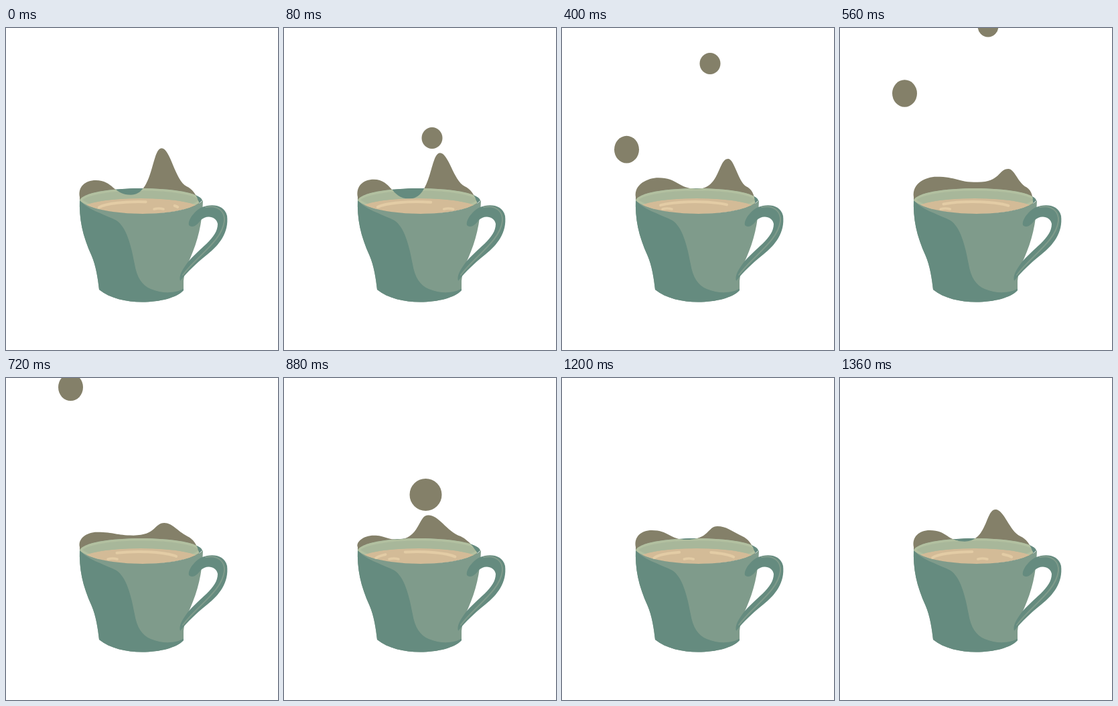
Write an HTML page with a canvas that moves like this. It is 406 by 480 pixels and loops after 1.44 s.

```html
<!DOCTYPE html>
<html lang="en">
<head>
<meta charset="utf-8">
<title>Splashing coffee</title>
<style>
  html, body { margin: 0; width: 100%; height: 100%; overflow: hidden; background: #fff; }
  canvas { display: block; }
</style>
</head>
<body>
<canvas width="406" height="480"></canvas>
<script>
const ctx = document.querySelector('canvas').getContext('2d');
const LOOP = 1440, STEP = 80;
const DARK = '#658b7f', LIGHT = '#7f9b8b', PALE = '#a8b79a', RIM = '#b2c0a0';
const BROWN = '#848069', COFFEE = '#d3bb97', CREAM = '#e3cca5';

const rim = new Path2D('M110 257C135 282 265 285 293 257C285 233 118 233 110 257Z');
const body = new Path2D('M110 255C109 285 114 309 128 340C134 354 137 372 139 390C155 403 180 408.5 203 408.5C230 408.5 255 402 265 391L265 377C267 360 271 352 275 343C286 318 293 292 294 257C265 285 135 282 110 255Z');
const shade = new Path2D('M110 255C116 269 148 278 165 287C180 297 187 325 192 352C195 371 203 384 216 389C235 397 255 395 266 388L266 410L130 410L100 300Z');
const handle = new Path2D('M273 294C271 284 285 270 293 267C305 262 326 262 330 280C333 305 318 324 300 338C285 350 272 362 260 377C258 370 262 362 270 351C288 328 316 314 316 292C314 280 298 278 290 287C284 296 277 298 273 294Z');
const handleShine = new Path2D('M298 267C318 263 327 275 326 288C322 318 285 340 264 368');
const surface = new Path2D();
surface.ellipse(201, 271, 91, 17, 0, 0, 7);

const drops = [
  { from: 80, to: 560, x: 221, y: 164, speed: .347, rx: 15.5, ry: 16 },
  { from: 320, to: 720, x: 96.5, y: 223, speed: .523, rx: 18.5, ry: 20.3 },
  { from: 800, to: 1120, x: 211.5, y: 216, speed: .525, rx: 24, ry: 24 }
];

// Soft bump in time, wrapping around the loop.
function pulse(t, center, width) {
  const d = (t - center + LOOP * 1.5) % LOOP - LOOP / 2;
  return Math.exp(-((d / width) ** 2));
}

// Left hump, dip and crest are joined by curves that are level at each of them.
function splashPath(t) {
  const humpX = 134 + 12 * pulse(t, 480, 180);
  const humpY = 227 - 16 * pulse(t, 240, 100) - 6 * pulse(t, 520, 130) + 8 * pulse(t, 850, 140);
  const crestX = 232 + 20 * pulse(t, 520, 250) - 20 * pulse(t, 860, 130);
  const crestY = 222 - 37 * pulse(t, 0, 120) - 30 * pulse(t, 320, 250) - 18 * pulse(t, 860, 110);
  const dipX = crestX - 46;
  const dipY = 241 + 15 * pulse(t, 130, 160) - 12 * pulse(t, 600, 150);
  const sideX = (crestX + 576) / 3, sideY = 236;
  const slope = sideX - crestX, fall = (dipX - humpX) / 2;

  const path = new Path2D();
  path.moveTo(110, 270);
  path.lineTo(110, 252);
  path.bezierCurveTo(107, humpY + 10, humpX - 16, humpY, humpX, humpY);
  path.bezierCurveTo(humpX + fall, humpY, dipX - fall, dipY, dipX, dipY);
  path.bezierCurveTo(dipX + 34, dipY, crestX - 15, crestY, crestX, crestY);
  path.bezierCurveTo(crestX + slope * .35, crestY, sideX - slope * .45, sideY - 8, sideX, sideY);
  path.quadraticCurveTo(sideX + 12, sideY + 5, 288, 260);
  path.lineTo(287, 270);
  path.closePath();
  return path;
}

function fill(path, color) {
  ctx.fillStyle = color;
  ctx.fill(path);
}

function stroke(path, color, width) {
  ctx.strokeStyle = color;
  ctx.lineWidth = width;
  ctx.stroke(path);
}

function clipped(path, paint) {
  ctx.save();
  ctx.clip(path);
  paint();
  ctx.restore();
}

function drawDrops(t) {
  for (const { from, to, x, y, speed, rx, ry } of drops) {
    if (t < from || t > to) continue;
    const path = new Path2D();
    path.ellipse(x, y - speed * (t - from), rx, ry, 0, 0, 7);
    fill(path, BROWN);
  }
}

// Streaks turn along the surface; each outlives one loop, so two can overlap.
function drawStreaks(t) {
  const sinceBirth = (t + LOOP - 800) % LOOP;
  for (const age of [sinceBirth / 2080, (sinceBirth + LOOP) / 2080]) {
    if (age > 1) continue;
    const tail = -170 + 140 * age ** 2.5;
    const head = -20 - 120 * Math.exp(-((age / .37) ** 2));
    const arc = new Path2D();
    arc.ellipse(198, 271, 62, 12, 0, tail * Math.PI / 180, head * Math.PI / 180);
    stroke(arc, CREAM, 4);
  }
  const slide = (t + LOOP - 400) % LOOP / 1040;
  if (slide < 1.1)
    stroke(new Path2D(`M${150 + 71 * slide ** 3} 270q7 -2 14 0`), CREAM, 3.5);
}

function draw(t) {
  ctx.clearRect(0, 0, 406, 480);
  ctx.lineCap = 'round';
  const wave = splashPath(t);
  fill(rim, DARK);
  fill(wave, BROWN);
  drawDrops(t);
  fill(body, LIGHT);
  clipped(body, () => fill(shade, DARK));

  clipped(rim, () => {
    fill(rim, DARK);
    clipped(wave, () => {
      fill(rim, PALE);
      stroke(rim, RIM, 7);
    });
    clipped(surface, () => {
      fill(surface, COFFEE);
      drawStreaks(t);
    });
  });

  fill(handle, DARK);
  stroke(handleShine, LIGHT, 2);
}

function tick() {
  draw(Math.floor(performance.now() % LOOP / STEP) * STEP);
  requestAnimationFrame(tick);
}
tick();
</script>
</body>
</html>
```
